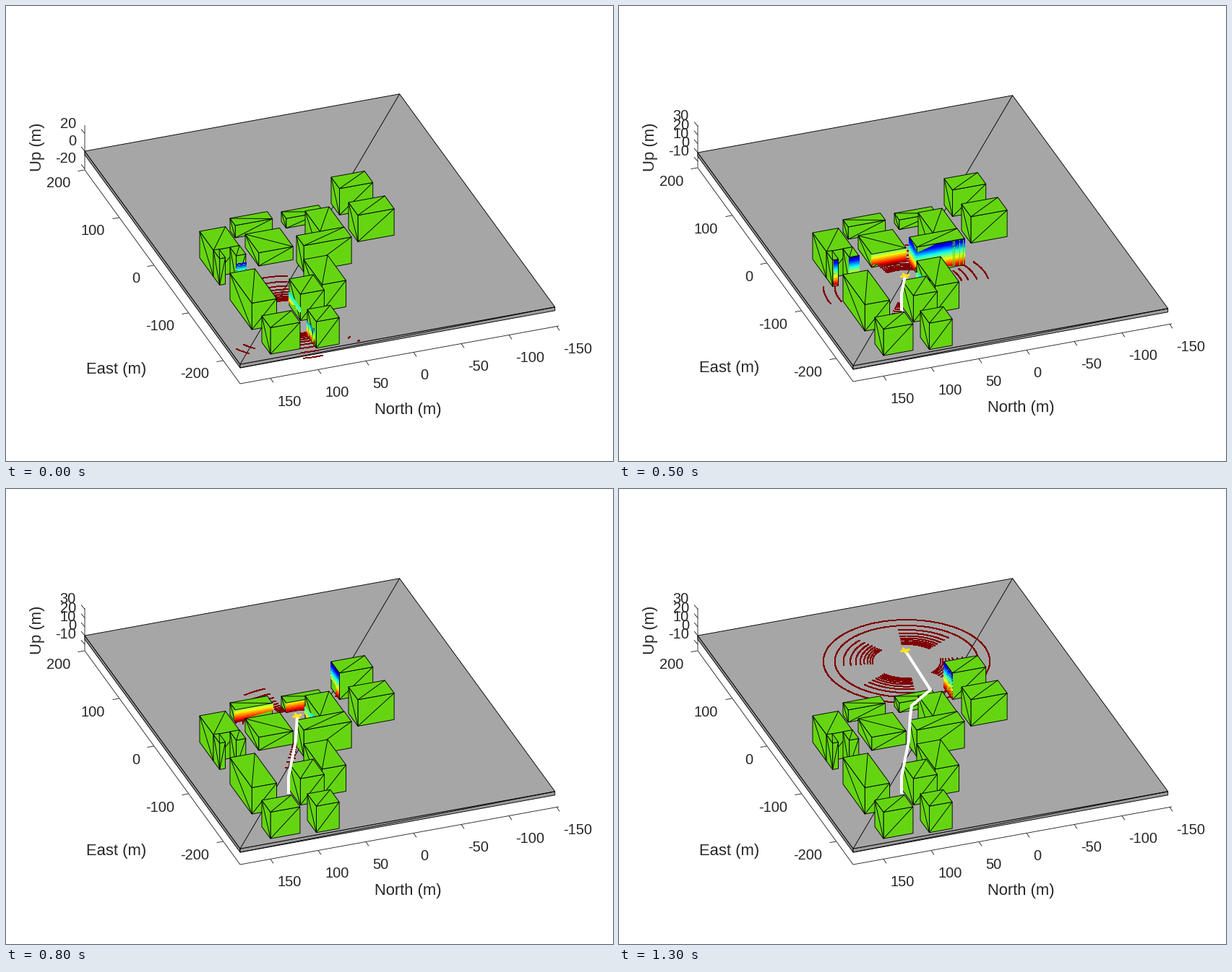
Animation of 840x630 px, one loop 1400 ms. Source, as a matplotlib script:

```python
from itertools import count

import numpy as np
import matplotlib.pyplot as plt
from matplotlib.animation import FuncAnimation

W, H, FRAMES = 840, 630, 14
INK, GREEN, GREY = "#262626", "#65d512", "#a6a6a6"
PT = 0.72                      # points per pixel at 100 dpi

# Screen pixels per metre north / east, and up
AXES = np.array([[-1.32, -0.48], [0.24, -0.6585]])
TO_GROUND = np.linalg.inv(AXES)
UP = 1.22
ALTITUDE = 12.3
RANGE = 92
TALL = 30

# Back to front: left roof corner on screen, then width, depth, height in metres
BUILDINGS = [
    (450, 239, 35, 24, TALL), (474, 274, 38, 27, TALL),
    (381, 287, 39, 14, 11), (310, 296, 39, 15, 14),
    (414, 286, 25, 43, TALL), (402, 320, 50, 21, TALL),
    (331, 318, 36, 39, 15),
    (268, 314, 27, 40, TALL), (310, 336, 10, 18, TALL), (287, 340, 6, 18, TALL),
    (412, 353, 25, 53, TALL), (392, 380, 25, 32, TALL),
    (310, 372, 26, 63, TALL),
    (417, 422, 24, 26, TALL), (354, 431, 31, 25, TALL),
]

# Flight route on screen, and the distance flown along it over time
ROUTE = np.array([(391, 422), (391, 398), (401, 349), (403, 314),
                  (405, 300), (431, 278), (395, 222)])
MILES = np.append(0, np.hypot(*np.diff(ROUTE, axis=0).T).cumsum())
KEY_TIMES, KEY_MILES = (2, 4, 6, 8, 10, 13), (4, 24, 74, 109, 165, 222)


def roof_of(x, y, width, depth):
    """Roof corners on screen: left, back, right, front."""
    corners = np.array([(0, 0), (-width, 0), (-width, -depth), (0, -depth)])
    return corners @ AXES.T + (x, y)


ROOFS = [roof_of(*b[:4]) for b in BUILDINGS]
BASES = [(roof + (0, b[4] * UP)) @ TO_GROUND.T for roof, b in zip(ROOFS, BUILDINGS)]
STARTS = np.concatenate(BASES)
ENDS = np.concatenate([np.roll(base, -1, axis=0) for base in BASES])
HEIGHTS = np.repeat([b[4] for b in BUILDINGS], 4)
OWNERS = np.repeat(np.arange(len(BUILDINGS)), 4)
VISIBLE = np.arange(len(STARTS)) % 4 >= 2      # only front and left walls face us
AZIMUTH = np.arange(0, 360, 0.5)
SLOPES = -0.15 - 0.024 * np.arange(9, -23, -1)


def cross(a, b):
    return a[..., 0] * b[..., 1] - a[..., 1] * b[..., 0]


def flown(i):
    return np.interp(i, KEY_TIMES, KEY_MILES)


def drone_at(i):
    return np.array([np.interp(flown(i), MILES, axis) for axis in ROUTE.T])


def scan(i):
    """Lidar returns: screen points, heights, owner (-1 = ground, -2 = unseen)."""
    origin = (drone_at(i) + (2, ALTITUDE * UP)) @ TO_GROUND.T
    angle = np.radians(AZIMUTH)
    ray = np.stack([np.cos(angle), np.sin(angle)], 1)[:, None]
    edge, offset = ENDS - STARTS, STARTS - origin
    with np.errstate(all="ignore"):
        den = cross(ray, edge)
        dist = cross(offset, edge) / den
        along = cross(offset, ray) / den
    ok = (dist > 0) & (along >= 0) & (along <= 1)
    dist = np.where(ok, dist, np.inf)[:, None, :]
    z = ALTITUDE + dist * SLOPES[:, None]
    dist = np.where((z >= 0) & (z <= HEIGHTS), dist, np.inf)
    wall, reach = dist.argmin(2), dist.min(2)
    floor = np.where(SLOPES < 0, -ALTITUDE / SLOPES, np.inf)
    on_floor = floor <= reach
    reach = np.minimum(reach, floor)
    owner = np.where(on_floor, -1, np.where(VISIBLE[wall], OWNERS[wall], -2))

    # Steep beams only look out through four sectors
    yaw = 100 if i < 9 else 127
    turn = (AZIMUTH - yaw + 45) % 90 - 45
    clear = (np.abs(turn) < 25)[:, None] | (SLOPES > -0.19)
    keep = clear & (reach < RANGE) & (SLOPES < (0.1 if i == 0 else 1))
    reach = np.where(keep, reach, 0)
    z = np.where(on_floor, 0, ALTITUDE + reach * SLOPES)
    points = (origin + ray * reach[..., None]) @ AXES.T
    points[..., 1] -= z * UP
    return points[keep], z[keep], owner[keep]


fig = plt.figure(figsize=(W / 100, H / 100), dpi=100, facecolor="white")
frame_ax = fig.add_axes([0, 0, 1, 1])
scene = fig.add_axes([0, 0, 1, 1])


def line(ax, pts, color=INK, width=0.9, z=1):
    ax.plot(*zip(*pts), color=color, lw=width * PT, zorder=z,
            solid_capstyle="butt")


def label(x, y, text, size=20, **kw):
    frame_ax.text(x, y, text, fontsize=size * PT, color=INK,
                  family="Liberation Sans", **{"va": "center_baseline", **kw})


def face(pts, color, z):
    scene.fill(*zip(*pts), facecolor=color, edgecolor="black", lw=0.9 * PT, zorder=z)


def draw_axes(first):
    drop = 2 if first else -1
    base = 521 + drop
    line(frame_ax, [(109, 165), (109, base - 296), (324, base), (765, base - 80)])
    for k in range(7):
        x, y = 366 + 66 * k, base - 7.6 - 12 * k
        line(frame_ax, [(x, y), (x + 4, y + 6)])
        label(375.5 + 66 * k, 544 + drop - 12.1 * k, str(150 - 50 * k), ha="left")
    for k in range(5):
        x, y = 108.5 + 48 * k, base - 296 + 66 * k
        line(frame_ax, [(x, y), (x - 9, y + 1.6)])
        label(89 + 48 * k, 241.5 + 66 * k + 2 * first, str(200 - 100 * k), ha="right")
    for value in (range(20, -21, -20) if first else range(30, -11, -10)):
        y = 203 - 2 * first - UP * value
        line(frame_ax, [(109, y), (104, y - 6)])
        label(97, y - 15.5, str(value), ha="right")
    label(556.5, 555 + drop, "North (m)", 22, ha="center")
    label(152.5, 499.5 + 2 * first, "East (m)", 22, ha="center")
    label(43, 195, "Up (m)", 22, rotation=90, ha="center", va="center")


def draw_ground(z):
    left, back, right, front = roof_of(109, 203, 330, 448)
    low = lambda p: p + (0, 5)
    face([left, front, low(front), low(left)], "#969696", z)
    face([front, right, low(right), low(front)], "#9c9c9c", z)
    face([left, back, right, front], GREY, z)
    line(scene, [back, front], "black", z=z)
    line(scene, [low(front), right], "black", z=z)


def draw_building(roof, height, returns, z):
    left, back, right, front = roof
    down = lambda p: p + (0, height * UP)
    for p, q, crease in ((right, front, (down(front), right)),
                         (front, left, (left, down(front)))):
        face([p, q, down(q), down(p)], GREEN, z)
        line(scene, crease, "black", z=z)
    returns(z + 0.3)
    face(roof, GREEN, z + 0.5)
    crease = (front, back) if height == TALL else (left, right)
    line(scene, crease, "black", z=z + 0.6)


def draw_drone(i, z):
    x, y = drone_at(i)
    line(scene, [*ROUTE[MILES < flown(i)], (x, y)], "white", 4, z)
    for dx, dy in ((6.5, -1.5), (3.5, 3.5)):
        line(scene, [(x - dx, y - dy), (x + dx, y + dy)], "#ffe619", 3, z + 1)


def update(i):
    first = i == 0
    for ax in (frame_ax, scene):
        ax.clear()
        ax.axis("off")
        ax.set_xlim(0, W)
    frame_ax.set_ylim(H, 0)
    scene.set_ylim(H + 2 * first, 2 * first)
    draw_axes(first)

    points, heights, owner = scan(i)
    colors = plt.get_cmap("jet_r")(heights / (22 if first else TALL))

    def returns(k):
        pick = owner == k
        return lambda z: scene.scatter(*points[pick].T, s=2, c=colors[pick],
                                       marker="s", lw=0, zorder=z)

    layer = count(1)
    draw_ground(next(layer))
    returns(-1)(next(layer))
    for k, roof in enumerate(ROOFS):
        draw_building(roof, BUILDINGS[k][4], returns(k), next(layer))
    if not first:
        draw_drone(i, next(layer))
    return []


anim = FuncAnimation(fig, update, frames=FRAMES, interval=100,
                     init_func=lambda: [], repeat=True, repeat_delay=0)
plt.show()
```
